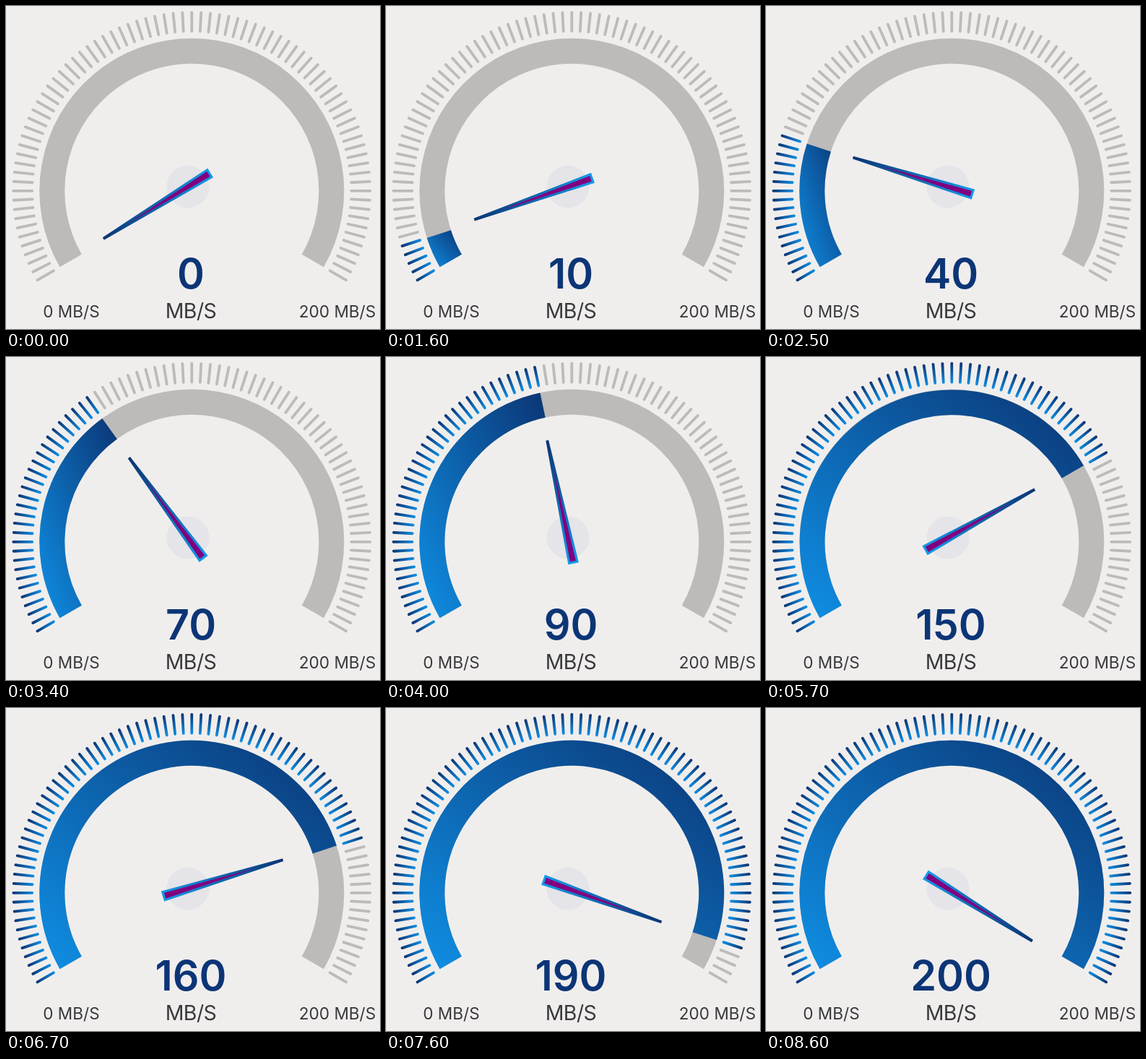
An HTML page that plays this animation: 518x447 px, repeating every 8.7 s.

```html
<!DOCTYPE html>
<html lang="en">
<head>
<meta charset="utf-8">
<title>Speed gauge</title>
<style>
  html, body { margin: 0; width: 100%; height: 100%; overflow: hidden; background: #f0eeed; }
  svg { display: block; width: 518px; height: 447px; }
  text { font-family: Inter, Roboto, sans-serif; text-anchor: middle; fill: #39393b; }
  #value { font-size: 57.5px; font-weight: 600; fill: #0c3576; }
  .unit { font-size: 28.5px; letter-spacing: -.02em; }
  .limit { font-size: 22.6px; }
  #ticks { stroke-width: 3.8; stroke-linecap: round; }
</style>
</head>
<body>
<svg viewBox="0 0 518 447">
  <defs>
    <linearGradient id="fillBlue" x1="0" y1="1" x2="1" y2="0">
      <stop offset="0" stop-color="#0f8fe4"/>
      <stop offset="1" stop-color="#0b3574"/>
    </linearGradient>
    <radialGradient id="tickBlue" gradientUnits="userSpaceOnUse" cx="257.3" cy="255.8" r="248">
      <stop offset=".885" stop-color="#0f8fe4"/>
      <stop offset="1" stop-color="#0b3574"/>
    </radialGradient>
    <linearGradient id="edgeBlue" gradientUnits="userSpaceOnUse" x1="-137" y1="0" x2="38" y2="0">
      <stop offset="0" stop-color="#0b3574"/>
      <stop offset="1" stop-color="#149bea"/>
    </linearGradient>
  </defs>
  <g id="ticks"></g>
  <path id="track" fill="#bcbbb9"/>
  <path id="fill" fill="url(#fillBlue)"/>
  <circle cx="252" cy="250" r="29.5" fill="#e5e4e9"/>
  <path id="needle" d="M-136-.4L35-5.8V5.8L-136 .4Z" fill="#800080" stroke="url(#edgeBlue)" stroke-width="3.2"/>
  <text id="value" x="256" y="390.5">0</text>
  <text class="unit" x="256" y="431.5">MB/S</text>
  <text class="limit" x="90.5" y="430.5">0 MB/S</text>
  <text class="limit" x="459" y="430.5">200 MB/S</text>
</svg>
<script>
const LOOP = 8700, MAX = 200, STEP = 10, SWEEP = 240;
const CX = 257.3, CY = 255.8;
// Moments at which the reading rises by one step
const rises = [1500, 1800, 2200, 2500, 2800, 3000, 3300, 3600, 3900, 4200,
               4600, 5000, 5300, 5500, 5700, 6600, 7200, 7400, 7600, 7900];
const $ = id => document.getElementById(id);

// Angle runs clockwise from the lower left end of the dial
function point(radius, angle) {
  const a = (angle + 150) * Math.PI / 180;
  return [CX + radius * Math.cos(a), CY + radius * Math.sin(a)].map(n => n.toFixed(2));
}

function band(angle) {
  if (!angle) return '';
  const large = angle > 180 ? 1 : 0;
  return `M${point(211, 0)}A211 211 0 ${large} 1 ${point(211, angle)}` +
         `L${point(176, angle)}A176 176 0 ${large} 0 ${point(176, 0)}Z`;
}

const ticks = [];
for (let a = 0; a <= SWEEP; a += 3) {
  const tick = document.createElementNS('http://www.w3.org/2000/svg', 'path');
  tick.setAttribute('d', `M${point(221, a)}L${point(247, a)}`);
  $('ticks').append(tick);
  ticks.push(tick);
}
$('track').setAttribute('d', band(SWEEP));

let shown = -1;
function show(value) {
  if (value === shown) return;
  shown = value;
  const angle = value / MAX * SWEEP;
  ticks.forEach((tick, i) =>
    tick.setAttribute('stroke', value && i * 3 <= angle ? 'url(#tickBlue)' : '#bcbbb9'));
  $('fill').setAttribute('d', band(angle));
  $('needle').setAttribute('transform', `translate(252 250) rotate(${-31.6 + value * 1.217})`);
  $('value').textContent = value;
}

function draw() {
  const t = performance.now() % LOOP;
  show(rises.filter(r => t >= r).length * STEP);
  requestAnimationFrame(draw);
}
draw();
</script>
</body>
</html>
```
